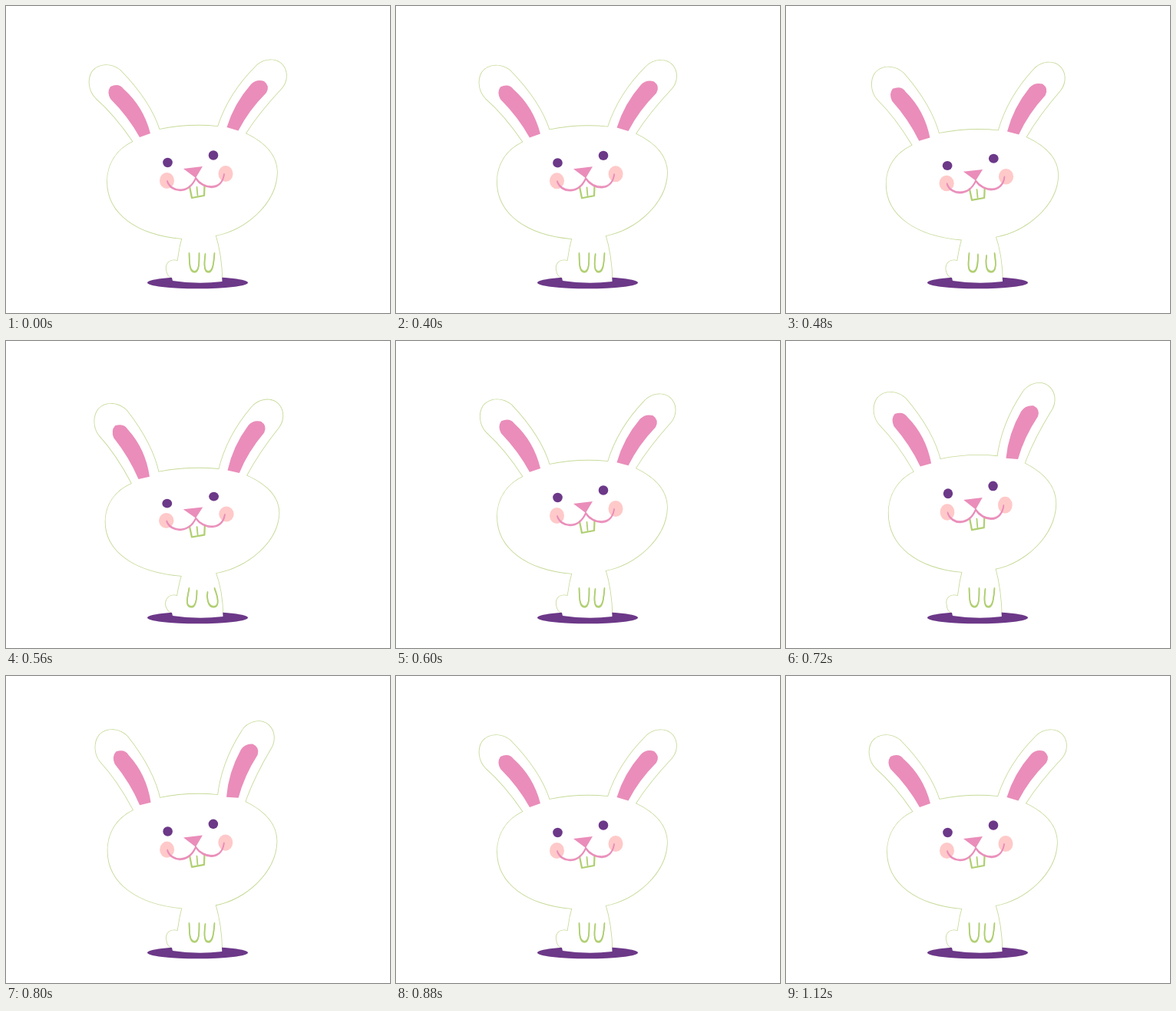
Write an HTML page with a canvas that moves like this. It is 500 px wide and 400 px high and loops after 1240 ms.

```html
<!DOCTYPE html>
<html>
<head>
<meta charset="utf-8">
<style>
html, body { margin: 0; width: 100%; height: 100%; overflow: hidden; background: #fff; }
canvas { display: block; }
</style>
</head>
<body>
<canvas id="stage" width="500" height="400"></canvas>
<script>
const ctx = document.getElementById('stage').getContext('2d');
const LOOP = 1240, STEP = 40;
const PURPLE = '#6c3888', PINK = '#ea8dba', BLUSH = '#ffc9c9', GREEN = '#b0cf72', OUTLINE = '#c6da98';

// time, squash (pixels the crown sinks), left and right ear turn in degrees
const KEYS = [
  [400, 0.5, 0, 0],
  [560, 10, 6.4, 4.7],
  [640, -10, -4.4, -2.4],
  [740, -6.5, 5, 13],
  [800, -2, 6, 12.4],
  [880, 0, 0, 0]
];

const head = new Path2D('M165 177Q182 165 199 161Q238 153 276 157Q297 160 312 166C339 179 353 196 353 217' +
  'C352 258 311 292 273 299Q250 304 229 303C170 298 132 270 132 229C132 206 144 187 165 177Z');
const ears = [
  { x: 182, y: 169, sign: 1,
    outer: new Path2D('M172 187L165 176Q142 142 117 120C108 111 106 96 112 86C121 74 138 75 149 84Q188 124 200 162L203 174Z'),
    inner: new Path2D('M174 171Q159 144 136 121Q131 112 136 105Q147 100 153 108Q179 131 188 166Z') },
  { x: 295, y: 160, sign: -1,
    outer: new Path2D('M273 169L276 157Q290 114 325 79C335 68 353 67 361 78C368 88 365 100 359 107Q329 139 312 166L306 177Z'),
    inner: new Path2D('M287.5 158Q297 127 319 102Q326 95 336 98Q344 104 339 113Q316 136 302.5 162.5Z') }
];
const nose = new Path2D('M231 212L256 209L247 224Z');
const mouth = new Path2D('M210 229C215 244 238 246 247 225C257 240 281 242 284 220');
const teeth = new Path2D('M239 235L242 250L258 247L258.5 234');
const toothGap = new Path2D('M248.5 236L249.5 247');
const closedEyes = new Path2D('M199 204Q211 208 222 201M259 195Q271 198 281 191');

function poseAt(time) {
  const i = KEYS.findIndex(key => key[0] > time);
  if (i < 1) return [0, 0, 0];
  const [from, to] = [KEYS[i - 1], KEYS[i]];
  const u = (time - from[0]) / (to[0] - from[0]);
  const eased = u * u * (3 - 2 * u);
  return [1, 2, 3].map(n => from[n] + (to[n] - from[n]) * eased);
}

function bodyPath(squash) {
  const neck = squash * 0.3, side = squash * 0.1;
  return new Path2D(`M231 ${296 + neck}Q226 313 ${223.5 - side / 2} 332C213 329 207.5 336 ${209 - side} 344` +
    `Q210 352 216 354L217 358Q249 363 ${281.5 + side} 359Q${281 + side} 325 272 ${296 + neck}Z`);
}

function pawsPath(squash) {
  const p = Math.max(squash, 0) / 10;
  return new Path2D(
    `M238.5 323C${239 - 2 * p} 332 ${238 - 6 * p} 347 ${245.5 - 4 * p} 347` +
    `C${252 - 4 * p} 347 ${251.5 - 3 * p} 333 ${251.5 - 3 * p} ${323 + 3 * p}` +
    `M${259.5 + 3 * p} ${324 + 4 * p}C${258.5 + 3 * p} 332 ${256.5 + 5 * p} 347 ${263.5 + 7 * p} 347` +
    `C${270 + 9 * p} 347 ${270.5 + 5 * p} 333 271.5 323`);
}

function fill(path, color) {
  ctx.fillStyle = color;
  ctx.fill(path);
}

function stroke(path, color, width) {
  ctx.strokeStyle = color;
  ctx.lineWidth = width;
  ctx.stroke(path);
}

// Thin where the path runs upright, thicker where it lies flat.
function brush(path, color) {
  for (const dy of [0, -1.3]) {
    ctx.save();
    ctx.translate(0, dy);
    stroke(path, color, 1.6);
    ctx.restore();
  }
}

function oval(x, y, rx, ry, color) {
  const path = new Path2D();
  path.ellipse(x, y, rx, ry, 0, 0, 7);
  fill(path, color);
}

// The crown moves by the full squash, the chin by 30 % of it.
function inHead(squash, paint) {
  const sx = 1 + squash * 0.0022, sy = 1 - squash * 0.00476;
  ctx.save();
  ctx.translate(243 * (1 - sx), 155 * (1 - sy) + squash);
  ctx.scale(sx, sy);
  paint();
  ctx.restore();
}

function inEar(ear, squash, degrees, paint) {
  ctx.save();
  ctx.translate(ear.x + (ear.x - 243) * squash * 0.0022, ear.y + squash);
  ctx.rotate(ear.sign * degrees * Math.PI / 180);
  ctx.translate(-ear.x, -ear.y);
  paint();
  ctx.restore();
}

function drawFace(blink) {
  if (blink) {
    stroke(closedEyes, PURPLE, 3);
  } else {
    oval(210.5, 204, 6.3, 6.2, PURPLE);
    oval(270, 194.5, 6.3, 6.2, PURPLE);
  }
  oval(209.5, 227.5, 9.5, 10.5, BLUSH);
  oval(286, 218.5, 9.5, 10.5, BLUSH);
  fill(teeth, '#fff');
  stroke(teeth, GREEN, 2.2);
  stroke(toothGap, GREEN, 1.8);
  brush(mouth, PINK);
  fill(nose, PINK);
}

function draw(time) {
  const [squash, ...turns] = poseAt(time);
  const body = bodyPath(squash);
  const silhouette = paint => {
    paint(body);
    ears.forEach((ear, i) => inEar(ear, squash, turns[i], () => paint(ear.outer)));
    inHead(squash, () => paint(head));
  };

  fill(new Path2D('M0 0H500V400H0Z'), '#fff');
  silhouette(path => stroke(path, OUTLINE, 1.7));
  oval(249.5, 360.5, 65.5, 7.8, PURPLE);
  silhouette(path => fill(path, '#fff'));
  brush(pawsPath(squash), GREEN);
  ears.forEach((ear, i) => inEar(ear, squash, turns[i], () => fill(ear.inner, PINK)));
  inHead(squash, () => drawFace(time >= 1040 && time < 1120));
}

const start = performance.now();
ctx.lineCap = 'round';
ctx.lineJoin = 'round';

function frame() {
  const time = (performance.now() - start) % LOOP;
  draw(Math.floor(time / STEP) * STEP);
  requestAnimationFrame(frame);
}
frame();
</script>
</body>
</html>
```
